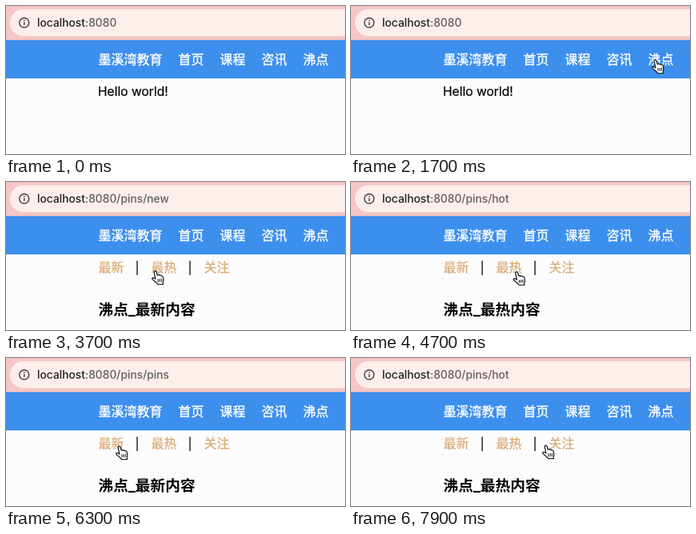
Recreate the animation shown at these times as an HTML page. Size 424 by 186 pixels, loop 8000 ms.

```html
<!DOCTYPE html>
<html lang="zh-CN">
<head>
<meta charset="utf-8">
<style>
  html, body { margin: 0; width: 100%; height: 100%; overflow: hidden; background: #fcfcfc; }
  svg { display: block; width: 100%; height: 100%; }
  text { font: 16px Inter, "Noto Sans CJK SC", "Noto Sans CJK", sans-serif; white-space: pre; }
  #address { font-size: 13.8px; font-weight: 500; fill: #242021; }
  #path { fill: #655d5e; }
  #nav text { fill: #fff; stroke: #fff; stroke-width: .35; }
  #hello { font-size: 15.6px; stroke: #000; stroke-width: .2; }
  #tabs text { fill: #d9a870; stroke: #d9a870; stroke-width: .2; }
  #tabs .bar { fill: #222; stroke: none; font-size: 15px; font-weight: 500; text-anchor: middle; }
  #heading { font-size: 18.72px; font-weight: 700; }
</style>
</head>
<body>
<svg viewBox="0 0 424 186">
  <rect width="424" height="42" fill="#f7c6c4"/>
  <rect y="42" width="424" height="1" fill="#d3b9c4"/>
  <rect x="5" y="4" width="460" height="34" rx="17" fill="#fdeeec"/>
  <g fill="none" stroke="#443c3c" stroke-width="1.4">
    <circle cx="22.8" cy="21" r="6"/>
    <path d="M22.8 20.3v3.8M22.8 17.4v1.5"/>
  </g>
  <text id="address" x="39" y="26">localhost<tspan id="path"></tspan></text>

  <g id="nav"><rect y="43" width="424" height="48" fill="#3d8fee"/></g>
  <text id="hello" x="115" y="113.4">Hello world!</text>
  <g id="tabs">
    <text class="bar" x="164" y="112.5">|</text>
    <text class="bar" x="230" y="112.5">|</text>
  </g>
  <text id="heading" x="115.5" y="167"></text>

  <g id="cursor" stroke-linejoin="round">
    <g id="hand">
      <path d="M-1.7 1.6C-2.1-.4 .5-.9 1.1 1L2.3 5.1C3 4.4 4 4.4 4.5 5.3C5.3 4.6 6.5 4.9 6.9 6C8 5.5 9 6.1 9.3 7.2C10.1 9.7 10.2 11.6 9.3 14L9.5 16.5H2.6C1.8 14.4-1.8 12.8-4.1 9.9C-4.9 8.3-2.4 7.6-.1 9.8Z" fill="#fff" stroke="#111" stroke-width="1.2"/>
      <path d="M3 10v3.8M5.2 9.8v4M7.4 9.6v4" fill="none" stroke="#111"/>
    </g>
    <path id="arrow" d="M0 0V14L3.3 11L5.5 16L7.8 15L5.7 10.2H10Z" fill="#111" stroke="#fff" stroke-width="1.2"/>
  </g>
</svg>
<script>
const LOOP = 8000;
const $ = id => document.getElementById(id);

function addText(parent, x, y, label) {
  const text = document.createElementNS("http://www.w3.org/2000/svg", "text");
  text.setAttribute("x", x);
  text.setAttribute("y", y);
  text.textContent = label;
  $(parent).append(text);
}
addText("nav", 115.5, 73, "墨溪湾教育");
["首页", "课程", "咨讯", "沸点"].forEach((label, i) => addText("nav", 215.5 + 52 * i, 73, label));
["最新", "最热", "关注"].forEach((label, i) => addText("tabs", 115.5 + 66 * i, 113, label));

// Each entry is [start time, value]; the value holds until the next entry.
const paths = [[0, ""], [2000, "/pins/new"], [4300, "/pins/hot"], [5300, "/pins/pins"], [6400, "/pins/new"], [7500, "/pins/hot"]];
const headings = [[0, ""], [2000, "最新"], [4300, "最热"], [5300, "最关注"], [6300, "最新"], [7500, "最热"]];
const shapes = [[0, ""], [150, "arrow"], [700, "hand"], [3000, "arrow"], [3400, "hand"]];

// Pointer tip: [time, x, y]
const track = [
  [150, 432, 136], [900, 384, 74], [1700, 381, 68], [2200, 381, 68], [2600, 361, 67], [2800, 359, 68],
  [3600, 188, 113], [3700, 187, 112], [4100, 190, 113], [4500, 190, 113], [5100, 257, 113],
  [5400, 257, 113], [6200, 142, 111], [6600, 142, 111], [7300, 203, 113], [7600, 203, 113], [7900, 244, 110]
];

const valueAt = (steps, t) => steps.findLast(([start]) => start <= t)[1];

function pointerAt(t) {
  const next = track.findIndex(([time]) => time > t);
  if (next < 0) return track.at(-1).slice(1);
  if (next === 0) return track[0].slice(1);
  const [t0, x0, y0] = track[next - 1], [t1, x1, y1] = track[next];
  const p = (t - t0) / (t1 - t0), ease = p * p * (3 - 2 * p);
  return [x0 + (x1 - x0) * ease, y0 + (y1 - y0) * ease];
}

function show(id, visible) {
  $(id).style.display = visible ? "" : "none";
}

function draw(now) {
  const t = now % LOOP;
  const topic = valueAt(headings, t), shape = valueAt(shapes, t);
  $("path").textContent = ":8080" + valueAt(paths, t);
  $("heading").textContent = topic && `沸点_${topic}内容`;
  show("hello", !topic);
  show("tabs", topic);
  show("hand", shape === "hand");
  show("arrow", shape === "arrow");
  $("cursor").setAttribute("transform", `translate(${pointerAt(t)})`);
  requestAnimationFrame(draw);
}
draw(0);
</script>
</body>
</html>
```
